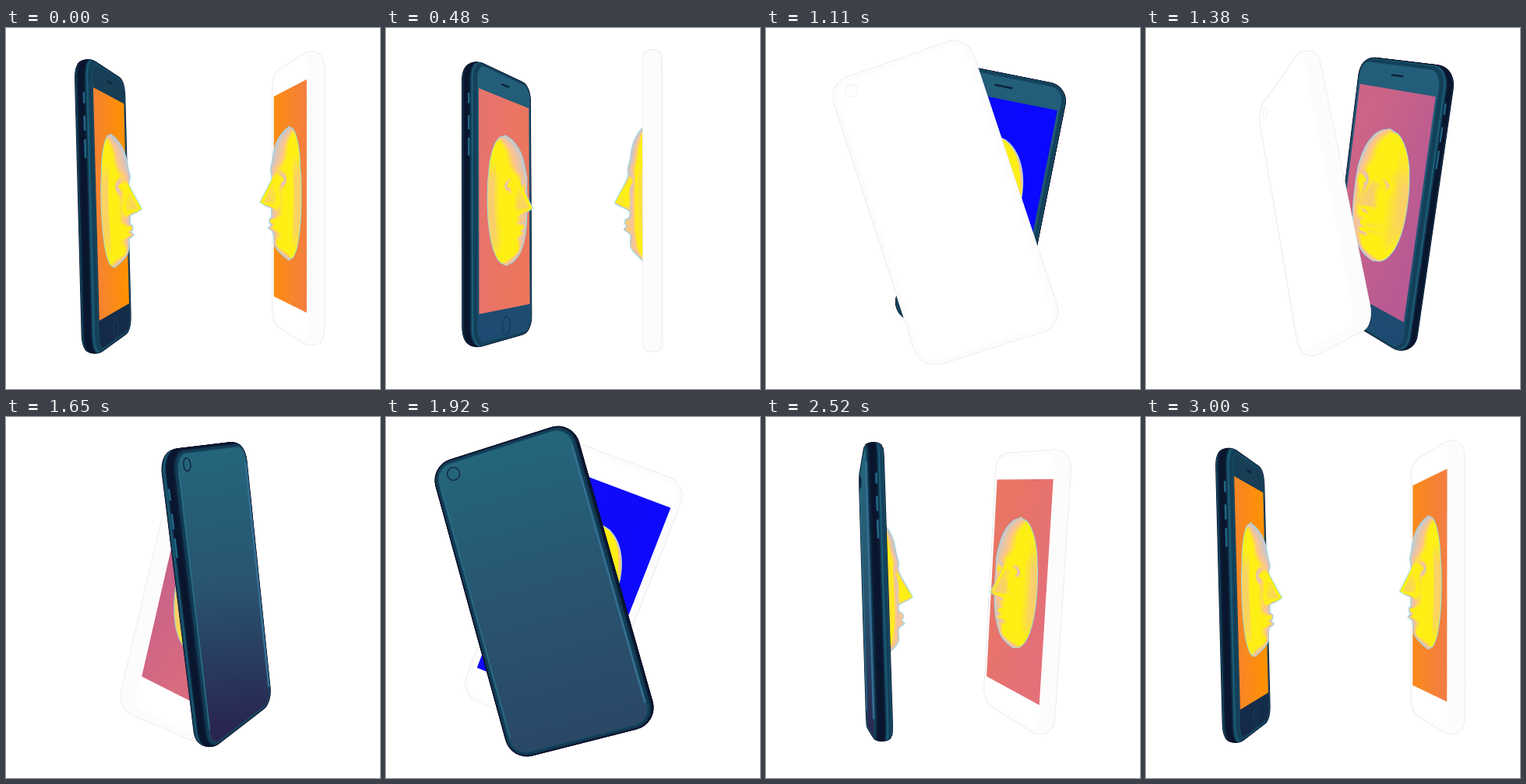
An HTML page with a canvas that plays this animation: 480x464 px, repeating every 3.03 s.

```html
<!DOCTYPE html>
<html lang="en">
<head>
<meta charset="utf-8">
<title>Two phones face to face</title>
<style>
html, body { margin: 0; width: 100%; height: 100%; overflow: hidden; background: #fff; }
canvas { display: block; }
</style>
</head>
<body>
<canvas id="stage" width="480" height="464"></canvas>
<script>
const ctx = document.getElementById('stage').getContext('2d');
const LOOP = 3030, STEP = 30, CAMERA = 1050;
const W = 93, H = 191, HALF_THICK = 11, RADIUS = 26;

// The pair circles a shared centre: time, orbit angle, radius, centre x, scale, roll of each phone.
const ORBIT = [
  [0, 0, 123, 250, .92, 0, 0],
  [480, 13, 103, 244, .92, 3, 3],
  [1110, 94, 85, 252, .935, 12, 17.5],
  [1650, 214, 25, 259, .945, 12.4, 23],
  [1920, 274, 60, 220, .98, 15, 22],
  [2520, 343, 98, 235, .92, 5, 7.2]
];

const SCREEN_RAMP = [[0, 10, 8, 255], [15, 28, 14, 240], [60, 228, 112, 120], [72, 243, 126, 64], [77, 255, 146, 0]];
const SKIN_RAMP = [[0, 200, 200, 205], [.3, 255, 196, 140], [.46, 255, 240, 20], [.75, 255, 240, 20], [1, 250, 206, 110]];

const rad = d => d * Math.PI / 180;
const bell = (x, size) => Math.exp(-((x / size) ** 2));
const clamp = (x, a, b) => Math.min(b, Math.max(a, x));

function ramp(stops, x) {
  x = clamp(x, stops[0][0], stops[stops.length - 1][0]);
  const i = Math.max(1, stops.findIndex(s => s[0] >= x));
  const a = stops[i - 1], b = stops[i], f = (x - a[0]) / (b[0] - a[0]);
  return `rgb(${[1, 2, 3].map(c => Math.round(a[c] + (b[c] - a[c]) * f))})`;
}

// Smooth cyclic curve through the keys; the angle gains one turn per loop.
function orbitAt(t) {
  const n = ORBIT.length;
  const key = i => {
    const turn = Math.floor(i / n), k = ORBIT[i - turn * n].slice();
    k[0] += turn * LOOP;
    k[1] += turn * 360;
    return k;
  };
  let i = 0;
  while (i < n - 1 && ORBIT[i + 1][0] <= t) i++;
  const [p, a, b, q] = [key(i - 1), key(i), key(i + 1), key(i + 2)];
  const d = b[0] - a[0], f = (t - a[0]) / d, f2 = f * f, f3 = f2 * f;
  return a.map((_, c) => {
    const m0 = (b[c] - p[c]) / (b[0] - p[0]) * d;
    const m1 = (q[c] - a[c]) / (q[0] - a[0]) * d;
    return a[c] * (2 * f3 - 3 * f2 + 1) + m0 * (f3 - 2 * f2 + f) + b[c] * (3 * f2 - 2 * f3) + m1 * (f3 - f2);
  });
}

function poseOf([, angle, radius, midX, scale, rollA, rollB], second) {
  const phi = angle + (second ? 180 : 0);
  const place = rad(phi + rollA);
  const dx = -radius * Math.cos(place), z = -radius * Math.sin(place);
  const x = midX + dx;
  const yaw = rad(90 - phi + .127 * (x - 245));
  const roll = rad(second ? rollB : rollA);
  const tilt = rad(-.75 * (1 + Math.cos(rad(phi))));
  return {
    x, y: 224 - .04 * dx, z, s: scale / (1 - z / CAMERA),
    cy: Math.cos(yaw), sy: Math.sin(yaw),
    cr: Math.cos(roll), sr: Math.sin(roll),
    ct: Math.cos(tilt), st: Math.sin(tilt)
  };
}

// u, v lie in the phone's plane, n points out of its screen.
function project(p, u, v, n) {
  const a = u * p.cr - v * p.sr, b = u * p.sr + v * p.cr;
  const z = -a * p.sy + n * p.cy, k = p.s / (1 - z / CAMERA);
  const x = (a * p.cy + n * p.sy) * k, y = b * k;
  return [p.x + x * p.ct - y * p.st, p.y + x * p.st + y * p.ct, z];
}

function trace(points) {
  points.forEach((q, i) => i ? ctx.lineTo(q[0], q[1]) : ctx.moveTo(q[0], q[1]));
  ctx.closePath();
}

function shape(points, fill, stroke, width) {
  ctx.beginPath();
  trace(points);
  if (fill) { ctx.fillStyle = fill; ctx.fill(); }
  if (stroke) { ctx.strokeStyle = stroke; ctx.lineWidth = width; ctx.stroke(); }
}

function line(a, b, color, width) {
  ctx.beginPath();
  ctx.moveTo(a[0], a[1]);
  ctx.lineTo(b[0], b[1]);
  ctx.strokeStyle = color;
  ctx.lineWidth = width;
  ctx.stroke();
}

function roundRect(p, inset, n) {
  const pts = [], r = RADIUS - inset;
  for (let c = 0; c < 4; c++) {
    const su = c === 0 || c === 3 ? 1 : -1, sv = c < 2 ? 1 : -1;
    for (let i = 0; i <= 8; i++) {
      const a = (c + i / 8) * Math.PI / 2;
      pts.push(project(p, su * (W - RADIUS) + r * Math.cos(a), sv * (H - RADIUS) + r * Math.sin(a), n));
    }
  }
  return pts;
}

function disc(p, u, v, r, n) {
  return Array.from({ length: 24 }, (_, i) => {
    const a = i * Math.PI / 12;
    return project(p, u + r * Math.cos(a), v + r * Math.sin(a), n);
  });
}

function gradient(a, b, colors) {
  const g = ctx.createLinearGradient(a[0], a[1], b[0], b[1]);
  colors.forEach((c, i) => g.addColorStop(i / (colors.length - 1), c));
  return g;
}

// Face relief: a dome with nose, eye sockets, lips, chin and brow.
const ROWS = 46, COLS = 26;
const mask = [];
for (let j = 0; j <= ROWS; j++) {
  const k = -1 + 2 * j / ROWS, v = -7 + 92 * k;
  const half = 57 * Math.sqrt(Math.max(0, 1 - Math.abs(k) ** 2.3));
  for (let i = 0; i <= COLS; i++) {
    const q = -1 + 2 * i / COLS, u = q * half;
    const ridge = v < 6 ? clamp((v + 34) / 40, 0, 1) : clamp((15 - v) / 9, 0, 1);
    const socket = bell(Math.abs(u) - 22, 11) * bell(v + 26, 7);
    const lips = bell(u, 17) * (bell(v - 31, 4) + bell(v - 41, 4));
    let n = 20 * Math.sqrt(1 - q * q) * (1 - Math.abs(k) ** 5);
    n += 21 * ridge * bell(u, 7 + ridge * 3) + 9 * lips - 7 * socket;
    n += 5 * bell(u, 18) * bell(v - 66, 12) + 3 * bell(u, 40) * bell(v + 40, 9);
    mask.push({ u, v, n: n + HALF_THICK, socket });
  }
}

function drawMask(p) {
  const pts = mask.map(m => project(p, m.u, m.v, m.n));
  const cells = [];
  for (let j = 0; j < ROWS; j++) {
    for (let i = 0; i < COLS; i++) {
      const o = j * (COLS + 1) + i;
      const quad = [pts[o], pts[o + 1], pts[o + COLS + 2], pts[o + COLS + 1]];
      cells.push({ quad, m: mask[o], z: quad.reduce((sum, q) => sum + q[2], 0) });
    }
  }
  cells.sort((a, b) => a.z - b.z);
  ctx.beginPath();
  cells.forEach(c => trace(c.quad));
  ctx.strokeStyle = '#8edbe8';
  ctx.lineWidth = 2.6;
  ctx.stroke();
  for (const { quad: [a, b, c, d], m } of cells) {
    const e = [0, 1, 2].map(i => c[i] - a[i]), f = [0, 1, 2].map(i => d[i] - b[i]);
    const nx = e[1] * f[2] - e[2] * f[1], ny = e[2] * f[0] - e[0] * f[2], nz = e[0] * f[1] - e[1] * f[0];
    const facing = nz / (Math.hypot(nx, ny, nz) || 1);
    if (facing <= 0) continue;
    const shade = facing - .16 * clamp((-30 - m.v) / 30, 0, 1) - .2 * m.socket;
    const color = ramp(SKIN_RAMP, shade);
    shape([a, b, c, d], color, color, .8);
  }
}

function drawFront(p, dark) {
  const at = (u, v) => project(p, u, v, HALF_THICK);
  const colors = p.cy < .35 ? ['#173f56', '#142a48'] : ['#235f7a', '#1d4a70'];
  shape(roundRect(p, 6, HALF_THICK), dark ? gradient(at(0, -H), at(0, H), colors) : '#fff');
  if (dark) {
    line(at(-13, -172), at(13, -172), '#0c2438', 2.5);
    shape(disc(p, 0, 171, 13, HALF_THICK), null, '#153a56', 1.4);
  }
  const angle = Math.acos(clamp(p.cy, -1, 1)) * 180 / Math.PI;
  const near = p.sy > 0 ? -84 : 84;
  const fill = gradient(at(near, 0), at(-near, 0), [ramp(SCREEN_RAMP, angle - 2), ramp(SCREEN_RAMP, angle + 2)]);
  shape([at(-84, -153), at(84, -153), at(84, 147), at(-84, 147)], fill);
}

function drawBack(p, dark) {
  const n = -HALF_THICK, at = (u, v) => project(p, u, v, n);
  const low = Math.abs(p.sy) > .4 ? '#282650' : '#2a4766';
  shape(roundRect(p, 6, n), dark ? gradient(at(0, -H), at(0, H), ['#24667c', '#29546f', low]) : '#fff');
  if (dark) {
    line(at(-86, -163), at(-86, 163), '#356f92', 2.5);
    line(at(86, -163), at(86, 163), '#2a6f88', 1.5);
  }
  shape(disc(p, 66, -172, 8, n), null, dark ? '#101c34' : '#f1f1f1', 1.2);
}

function drawButtons(p) {
  const side = p.sy > 0 ? -W - 1 : W + 1;
  if (Math.abs(p.sy) < .2) return;
  for (let i = 0; i < 3; i++) {
    const top = -146 + i * 30, end = top + 14 + i * 5;
    line(project(p, side, top, 1), project(p, side, end, 1), '#1f6684', 3);
    line(project(p, side, top, -1), project(p, side, end, -1), '#0a1630', 1.4);
  }
}

function sideColor(k, dark) {
  if (!dark) return '#fcfcfc';
  const shine = bell(k - .5, .2) + .8 * bell(Math.abs(k) - 1, .25);
  return `rgb(${[10 + 18 * shine, 22 + 72 * shine, 46 + 74 * shine].map(Math.round)})`;
}

// The body is a stack of rounded outlines, drawn from far to near.
function drawPhone(p, dark) {
  const front = p.cy > 0;
  const layers = Array.from({ length: 13 }, (_, i) => (front ? 1 : -1) * (i / 6 - 1));
  const outlines = layers.map(k => roundRect(p, 6 * (1 - Math.sqrt(1 - k * k)), k * HALF_THICK));
  if (!front) drawMask(p);
  outlines.forEach(o => shape(o, null, dark ? '#0b0d28' : '#e6e6e6', 3.4));
  outlines.forEach((o, i) => {
    const color = sideColor(layers[i], dark);
    shape(o, color, color, 2);
  });
  if (dark) drawButtons(p);
  if (front) {
    drawFront(p, dark);
    drawMask(p);
  } else {
    drawBack(p, dark);
  }
}

function draw(t) {
  ctx.fillStyle = '#fff';
  ctx.fillRect(0, 0, 480, 464);
  ctx.lineJoin = 'round';
  const orbit = orbitAt(t);
  [true, false]
    .map(dark => ({ dark, pose: poseOf(orbit, !dark) }))
    .sort((a, b) => a.pose.z - b.pose.z)
    .forEach(({ dark, pose }) => drawPhone(pose, dark));
}

const start = performance.now();
function tick() {
  const t = (performance.now() - start) % LOOP;
  draw(Math.floor(t / STEP) * STEP);
  requestAnimationFrame(tick);
}
draw(0);
requestAnimationFrame(tick);
</script>
</body>
</html>
```
